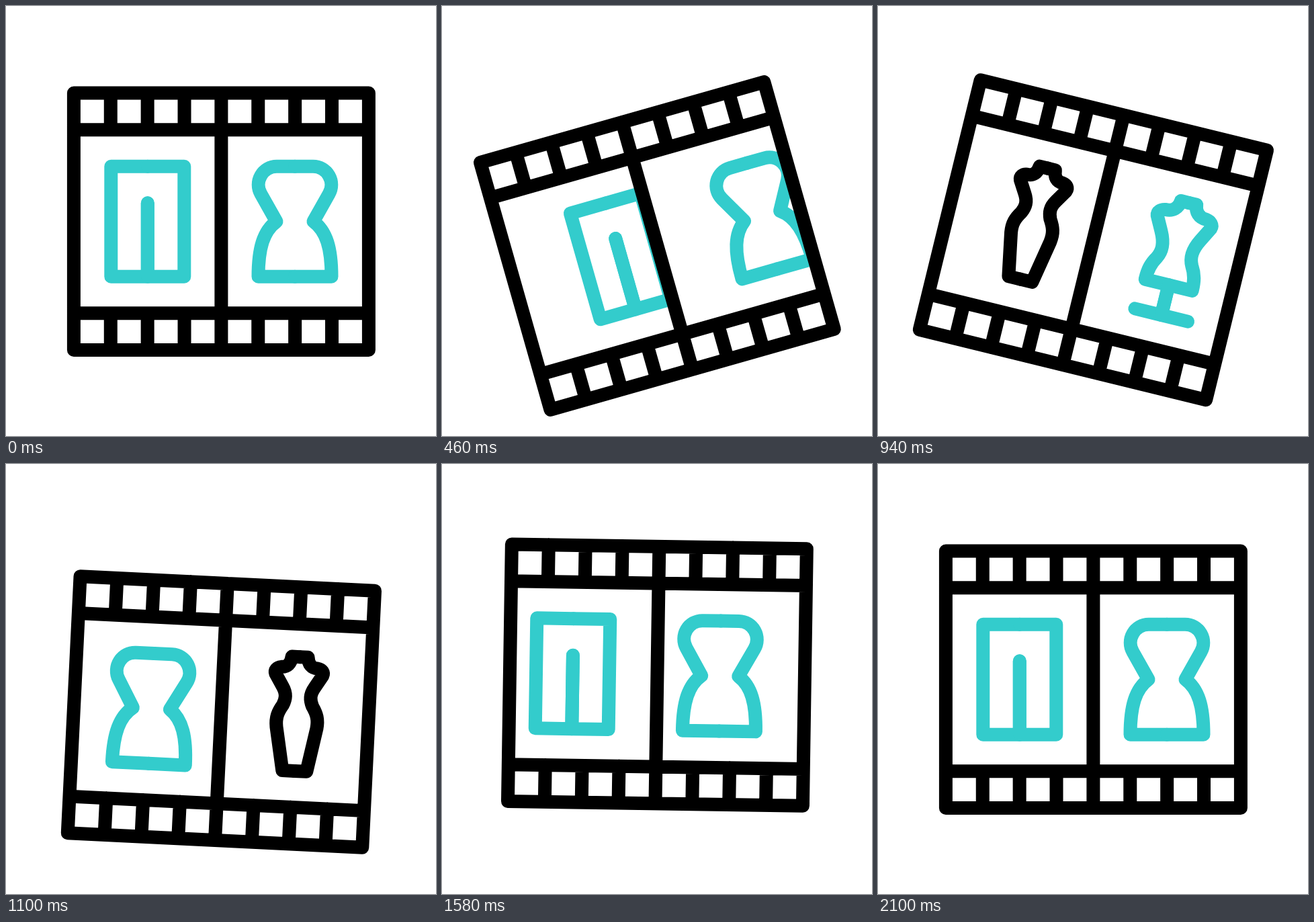
These frames come from a looping animation (640x640 px, 2.4 s). An HTML page with a canvas:

```html
<!DOCTYPE html>
<html lang="en">
<head>
<meta charset="utf-8">
<title>Fashion film strip</title>
<style>
  html, body { margin: 0; width: 100%; height: 100%; overflow: hidden; background: #fff; }
  canvas { display: block; width: 640px; height: 640px; }
</style>
</head>
<body>
<canvas id="stage" width="640" height="640"></canvas>
<script>
const ctx = document.getElementById('stage').getContext('2d');
const LOOP = 2400, TEAL = '#33cccc', BLACK = '#000';
const W = 219.5, H = 191.25, BAND = 136.5;   // half sizes of the film
const STRIP = 871;                           // length after which the garments repeat

// Left halves of the garments; each is mirrored when drawn.
const items = [
  { x: -109.6, color: TEAL, half: 'M0,-82 H-54.5 V82 H0 V-27.5' },
  { x: 109.6, color: TEAL,
    half: 'M0,-82 H-27 A27.3,27.3 0 0 0 -50.6,-41 L-27.5,0 C-47,14 -54.5,40 -54.5,82 H0' },
  { x: 326.8, color: BLACK,
    half: 'M0,-87.5 H-12 C-13,-77 -18,-71.5 -27,-71.5 C-34,-70.5 -37,-66 -35,-61 ' +
      'L-24,-43 C-17,-32 -18,-24 -22,-15 C-29,-4 -32,4 -30,18 L-18,82.5 H0' },
  { x: 543.3, color: TEAL,
    half: 'M0,-87.5 H-12 C-13,-76 -20,-69.5 -31,-69.5 C-38,-68.5 -43,-64 -41,-58 ' +
      'L-30,-37 C-21,-20 -21,-8 -27,3 C-34,14 -36,24 -36,38.5 H0 V84.5 H-40.5' }
].map(item => ({ ...item, path: new Path2D(item.half) }));

const frame = new Path2D();
frame.rect(-W, -H, 2 * W, 2 * H);
const line = (x1, y1, x2, y2) => { frame.moveTo(x1, y1); frame.lineTo(x2, y2); };
for (const y of [-BAND, BAND]) line(-W, y, W, y);
for (let i = 1; i < 8; i++) {
  const x = -W + i * W / 4;
  line(x, -H, x, -BAND);
  line(x, BAND, x, H);
}
line(0, -BAND, 0, BAND);

// Symmetric cubic-bezier(a, 0, 1 - a, 1)
function ease(t, a) {
  if (t <= 0 || t >= 1) return t <= 0 ? 0 : 1;
  let lo = 0, hi = 1, s;
  for (let i = 0; i < 24; i++) {
    s = (lo + hi) / 2;
    const r = 1 - s;
    const x = 3 * a * s * r * r + 3 * (1 - a) * s * s * r + s * s * s;
    if (x < t) lo = s; else hi = s;
  }
  return s * s * (3 - 2 * s);
}

// Keys are [time, value] pairs.
function track(keys, t) {
  const i = keys.findIndex(k => k[0] > t);
  if (i < 0) return keys[keys.length - 1][1];
  const [t0, v0] = keys[i - 1], [t1, v1] = keys[i];
  return v0 + (v1 - v0) * ease((t - t0) / (t1 - t0), 0.17);
}

const swing = [[0, 0], [410, -18], [880, 16.2], [1286, -8], [1706, 4], [2100, 0]];
const bounce = [[0, 0], [390, 54], [702, -44], [1050, 55], [1430, -23], [1775, 15.5], [2100, 0]];

function drawItem({ color, path }, x) {
  ctx.strokeStyle = color;
  for (const side of [1, -1]) {
    ctx.save();
    ctx.translate(x, 0);
    ctx.scale(side, 1);
    ctx.stroke(path);
    ctx.restore();
  }
}

function draw() {
  const t = performance.now() % LOOP;
  const shift = STRIP * ease(t / 1860, 0.7);

  ctx.fillStyle = '#fff';
  ctx.fillRect(0, 0, 640, 640);
  ctx.lineWidth = 20;
  ctx.lineCap = ctx.lineJoin = 'round';

  ctx.save();
  ctx.translate(320.4, 320.75 + track(bounce, t));
  ctx.rotate(track(swing, t) * Math.PI / 180);

  ctx.save();
  ctx.beginPath();
  ctx.rect(-W, -H, 2 * W, 2 * H);
  ctx.clip();
  for (const item of items) {
    drawItem(item, item.x + shift);
    drawItem(item, item.x + shift - STRIP);
  }
  ctx.restore();

  ctx.strokeStyle = BLACK;
  ctx.stroke(frame);
  ctx.restore();
  requestAnimationFrame(draw);
}
draw();
</script>
</body>
</html>
```
